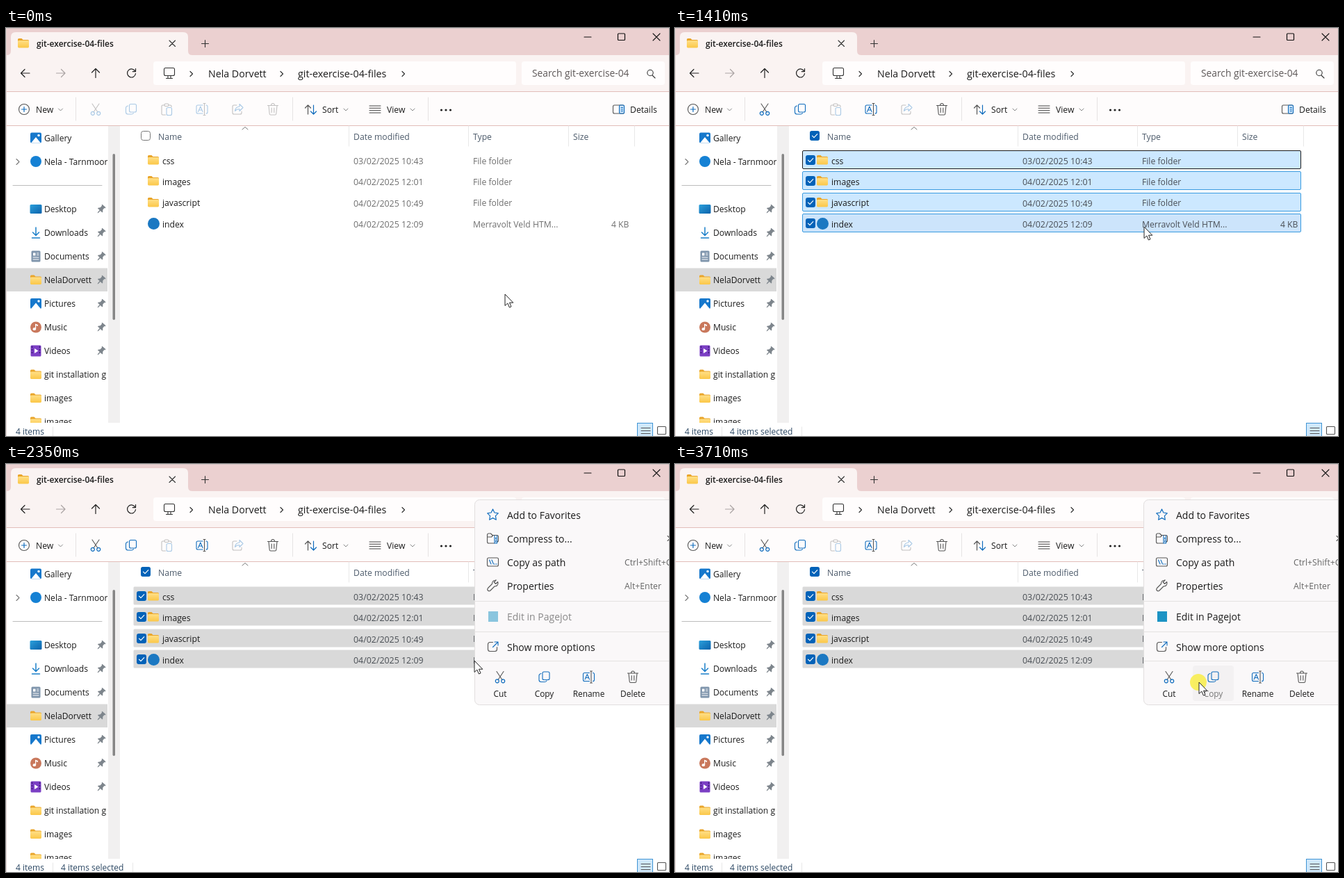
Write an HTML page that moves like this. It is 954 px wide and 587 px high and loops after 3840 ms.

```html
<!DOCTYPE html>
<html lang="en">
<head>
<meta charset="utf-8">
<title>File explorer</title>
<style>
html, body { margin: 0; width: 100%; height: 100%; overflow: hidden; background: #fff; }
svg { display: block; width: 954px; height: 587px; }
text { font-family: "Open Sans", "Noto Sans", sans-serif; white-space: pre; }
</style>
</head>
<body>
<svg id="stage" viewBox="0 0 954 587" xmlns="http://www.w3.org/2000/svg"></svg>
<script>
const LOOP = 3840;
const INK = '#1b1b1b', BLUE = '#0f6cbd', GREY = '#555';

// Drawing helpers
const text = (x, cy, s, size = 12.2, fill = INK, more = '') =>
  `<text x="${x}" y="${cy + size * 0.36}" font-size="${size}" fill="${fill}" ${more}>${s}</text>`;
const rect = (x, y, w, h, fill, more = '') =>
  `<rect x="${x}" y="${y}" width="${w}" height="${h}" fill="${fill}" ${more}/>`;
const line = (d, color = GREY, w = 1.1, more = '') =>
  `<path d="${d}" fill="none" stroke="${color}" stroke-width="${w}" stroke-linecap="round" stroke-linejoin="round" ${more}/>`;
const shape = (d, fill, more = '') => `<path d="${d}" fill="${fill}" ${more}/>`;
const dot = (x, y, r, fill, more = '') => `<circle cx="${x}" cy="${y}" r="${r}" fill="${fill}" ${more}/>`;
const group = (id, body, more = '') => `<g id="${id}" ${more}>${body}</g>`;
const at = (x, y, body, more = '') => `<g transform="translate(${x} ${y})" ${more}>${body}</g>`;
const box = (x, y, w, h, color, r = 2) => rect(x, y, w, h, 'none', `rx="${r}" stroke="${color}" stroke-width="1.1"`);
const chevron = (x, y) => line(`M${x - 2} ${y - 3.5}l3.5 3.5l-3.5 3.5`, '#333', 1.2);
const drop = (x, y) => line(`M${x - 3} ${y - 1.5}l3 3l3 -3`, '#888', 1);

// Icons, each centred on 0,0
const icon = {
  cut: line('M-5 -8L3 4M5 -8L-3 4') + dot(-4.2, 5.8, 2.5, 'none', `stroke="${BLUE}" stroke-width="1.2"`) +
    dot(4.2, 5.8, 2.5, 'none', `stroke="${BLUE}" stroke-width="1.2"`),
  copy: box(-2.5, -7.5, 10, 11.5, BLUE) + line('M-4.5 -5q-3 .5-3 3v6q0 3 3 3h5q2 0 3-1.5', BLUE),
  paste: line('M-3 -6h-2.5q-1.5 0-1.5 1.5v11q0 1.5 1.5 1.5h4M3 -6h2.5q1.5 0 1.5 1.5v1') +
    box(-3, -8, 6, 3.5, GREY, 1.5) + box(0, -2.5, 7.5, 11, BLUE),
  rename: line('M1 -6h-7q-2 0-2 2v8q0 2 2 2h7M6 -6q2 0 2 2v8q0 2-2 2', BLUE) +
    line('M3.5 -8.5v17M2 -8.5h3M2 8.5h3', GREY) + line('M-5.5 3.5L-2.2 -4L1 3.5M-4.4 1h4.4', BLUE),
  share: line('M-1 -6h-4q-2 0-2 2v9q0 2 2 2h9q2 0 2-2v-2') +
    line('M-3.5 2.5q.5-6 6.5-6.5v-3.5l5 5l-5 5v-3q-4 0-6.5 3z', BLUE),
  trash: line('M-7.5 -5.5h15M-2.5 -5.5q0-3 2.5-3t2.5 3M-6 -5.5l1.2 12q.2 1.5 1.6 1.5h6.4q1.4 0 1.6-1.5l1.2-12M-1.8 -2v6.5M1.8 -2v6.5'),
  folder: shape('M-8 -5.5q0-1.5 1.5-1.5h4l2 2h7q1.5 0 1.5 1.5v4h-16z', '#e9a52b') +
    rect(-8, -4, 16, 10.5, 'url(#gold)', 'rx="1.4"'),
  pin: shape('M-3.4 -6h6.8v1.6h-1v3.6l2 2.4v1h-3.7v4l-.7 1.4l-.7-1.4v-4h-3.7v-1l2-2.4v-3.6h-1z', '#7d858c', 'transform="rotate(42)"'),
  photo: rect(-8, -7.5, 16, 15, '#1678cc', 'rx="2"') + shape('M-7 7.5L0 -1l7 8.5z', '#fff') + dot(4, -3.5, 1.7, '#fff'),
  desktop: rect(-8.5, -6.5, 17, 13, 'url(#desk)', 'rx="1.5"'),
  download: line('M0 -7.5v11M-4.5 -.5L0 4l4.5 -4.5M-5.5 7.5h11', '#1a7fc9', 1.5),
  doc: rect(-6.5, -8, 13, 16, '#7f95ac', 'rx="1.5"') + rect(-4, -5, 3.5, 4, '#fff') +
    line('M1.5 -4.5h2.5M1.5 -2h2.5M-4 1.5h8M-4 4.5h8', '#fff', 1),
  music: dot(0, 0, 8, '#c9785c') + shape('M-1 -5l4 1.5v2l-2.8-1v5a2.3 2 0 1 1-1.2-1.7z', '#fff'),
  video: rect(-7.5, -8, 15, 16, '#7b3fc4', 'rx="1.5"') + shape('M-2 -3.5l5.5 3.5l-5.5 3.5z', '#fff') +
    line('M-5.5 -6v12M5.5 -6v12', '#3e1a78', 1.6, 'stroke-dasharray="1 3"'),
  star: line('M0 -8l2.4 5l5.4 .8l-3.9 3.9l.9 5.5l-4.8-2.6l-4.8 2.6l.9-5.5l-3.9-3.9l5.4-.8z', BLUE, 1.2),
  zip: line('M2 7h-8q-2 0-2-2v-10q0-2 2-2h3l2.5 2.5h6.500q2 0 2 2v5.500q0 2-2 2') + line('M-8 -2h6l2-2') +
    line('M2.500 -4v11h3.500v-11M4.200 -1v2M4.200 3v2', BLUE),
  path: box(-8, -6, 16, 12, GREY) + line('M-5 -3l2.500 6M-1.500 -3l2.500 6', BLUE) + dot(3, 3, .8, BLUE) + dot(5.500, 3, .8, BLUE),
  wrench: line('M3.500 -7.500q-4.500 0-4.500 5l-6 6q-1.500 2 0 3.500t3.500 0l6-6q5 0 5-5l-.300-1.500l-3 3l-2.500-2.500l3-3z'),
  more: line('M0 -6.500h-4q-3 0-3 3v7q0 3 3 3h7q3 0 3-3v-3') + line('M2.500 -7h5v5M7 -6.500L0 .500', BLUE)
};
icon.tick = box => rect(box[0], box[1], 14, 14, '#0062b8', 'rx="3"') +
  line(`M${box[0] + 3.5} ${box[1] + 7.2}l2.500 2.500l4.700 -5`, '#fff', 1.2);

function titleBar() {
  return rect(0, 0, 954, 92, '#faf3f2') + rect(0, 0, 954, 39, '#ebd0d0') +
    shape('M1 39q6 0 6-6v-20q0-7 7-7h241q7 0 7 7v20q0 6 6 6z', '#faf3f2') +
    line('M0 .5h954', '#d6c6c6', 1) +
    at(25, 22, icon.folder) + text(44, 22.5, 'git-exercise-04-files', 12, INK, 'font-weight="600"') +
    line('M235 18l8.5 8.5M243.500 18l-8.500 8.500M281.500 22.500h10M286.500 17.500v10', '#333') +
    line('M832 13h10M931 8l10 10M941 8l-10 10', '#111', 1.1) + rect(880.5, 8, 10, 9.5, 'none', 'rx="1" stroke="#111" stroke-width="1.2"');
}

function navBar() {
  return rect(212, 48, 522, 34, '#fffdfd', 'rx="4"') + rect(742, 48, 206, 34, '#fffdfd', 'rx="4"') +
    line('M21.5 65h12.500M27 59.500l-5.500 5.500l5.500 5.500', '#222', 1.2) +
    line('M72.500 65h12.500M79.500 59.500l5.500 5.500l-5.500 5.500', '#a9a3a3', 1.2) +
    line('M129 71.500v-13M123.500 64l5.500 -5.500l5.500 5.500', '#222', 1.2) +
    line('M186 62.500a6 6 0 1 0 .500 3M186.500 58.500v4.200h-4.200', '#222', 1.2) +
    box(227.5, 57.5, 15, 11, '#333') + line('M233 69v3M237 69v3M230.500 72.500h9', '#333') +
    chevron(267, 66) + text(291, 65.500, 'Nela Dorvett', 14.2) +
    chevron(397, 66) + text(420, 65.500, 'git-exercise-04-files', 14.3) + chevron(572, 66) +
    text(757, 65.500, 'Search git-exercise-04', 13.8, '#5c5757') +
    dot(927, 64.500, 4.2, 'none', 'stroke="#333" stroke-width="1.1"') + line('M930 68l4 4', '#333');
}

function toolBar() {
  const tools = [['cut', 129], ['copy', 180], ['paste', 231], ['rename', 282], ['share', 333], ['trash', 384]];
  return rect(0, 92, 954, 49, '#fefcfc') + line('M0 91.500h954M0 140.500h954', '#e2bdb9', 1) +
    dot(26, 117, 7.5, 'none', 'stroke="#555" stroke-width="1.1"') + line('M22.500 117h7M26 113.500v7', BLUE, 1.2) +
    text(43, 117.500, 'New') + drop(78.500, 117.500) +
    line('M100.500 100v33M412.500 100v33M607.500 100v33', '#e6e3e3', 1) +
    tools.map(([n, x]) => at(x, 117, icon[n], `id="tool-${n}" opacity=".35"`)).join('') +
    line('M434.500 124v-13M430.500 115l4 -4l4 4', GREY, 1.2) + line('M442.500 111v13M438.500 120l4 4l4 -4', BLUE, 1.2) +
    text(455, 117.500, 'Sort') + drop(489, 117.500) +
    line('M523 112h16M523 115.300h16M523 118.600h16M523 122h16', '#444', 1) +
    text(548, 117.500, 'View') + drop(585, 117.500) +
    [626.5, 633, 639.5].map(x => dot(x, 118, 1.6, '#222')).join('') +
    box(873.5, 111, 16, 12, GREY) + rect(882.5, 111.5, 6.5, 11, '#cfe6fa') + box(882.5, 111, 7, 12, BLUE, 1.5) +
    line('M885 114.500h2.500M885 117h2.500M885 119.500h2.500', BLUE, 1) + text(898, 117.500, 'Details');
}

function sideBar() {
  const items = [['desktop', 'Desktop'], ['download', 'Downloads'], ['doc', 'Documents'], ['folder', 'NelaDorvett'],
    ['photo', 'Pictures'], ['music', 'Music'], ['video', 'Videos'], ['folder', 'git installation g'],
    ['folder', 'images'], ['folder', 'images']];
  const list = items.map(([n, s], i) => {
    const y = 260.5 + 34 * i;
    return at(43, y, icon[n]) + text(55, y + .5, s, 12.1) + (i < 7 ? at(137, y, icon.pin) : '');
  }).join('');
  return `<g clip-path="url(#side)">` + rect(0, 345.5, 146, 33.500, '#d9d9d9') + at(43, 158, icon.photo) +
    text(55, 158.500, 'Gallery', 12.1) + line('M15 188.500l4 4l-4 4', '#777') + dot(43, 192, 8, '#1581d4') +
    text(55, 192.500, 'Nela - Tarnmoor', 12.1) + line('M10 226.500h128', '#bdbdbd', 1) + list + '</g>' +
    rect(147, 141, 17, 427, '#f1f0f0') + rect(153.5, 181, 3.5, 239, '#868686', 'rx="1.75"');
}

const rows = [['css', '03/02/2025 10:43', 'File folder'], ['images', '04/02/2025 12:01', 'File folder'],
  ['javascript', '04/02/2025 10:49', 'File folder'], ['index', '04/02/2025 12:09', 'Merravolt Veld HTM...', '4 KB']];

function fileList() {
  const head = '#4d5b6b';
  return line('M493.500 141v29M665.500 141v29M809.500 141v29M904.500 141v29', '#e8e8e8', 1) +
    line('M340 146l4 -3.500l4 3.500', '#777', 1) +
    rect(194.5, 148.5, 13, 13, '#fff', 'rx="3" stroke="#777" stroke-width="1"') + group('tick-all', icon.tick([194, 148])) +
    text(219, 156.500, 'Name', 12.2, head) + text(500, 156.500, 'Date modified', 12.2, head) +
    text(672, 156.500, 'Type', 12.2, head) + text(816, 156.500, 'Size', 12.2, head) +
    rows.map(([name, date, type, size], i) => {
      const y = Math.round(30.4 * i), c = 191 + 30.4 * i;
      return rect(183.5, 176.5 + y, 717, 26, '#cce8ff', `id="row${i}" rx="1.5"`) +
        group('tick' + i, icon.tick([188, 183 + y])) +
        (i < 3 ? at(212, 190 + y, icon.folder) : dot(212.5, 281.500, 8.5, '#1b78c2')) +
        text(225, c + .3, name) +
        group('meta' + i, text(500, c + .3, date, 12.4, '') + text(672, c + .3, type, 12.2, '') +
          (size ? text(896.5, c + .3, size, 12.2, '', 'text-anchor="end"') : ''));
    }).join('');
}

function statusBar() {
  const c = '#2b4763';
  return rect(0, 568, 954, 19, '#fff') + text(14, 581, '4 items', 12, c) + line('M67.500 574v13', '#e8e8e8', 1) +
    group('picked', text(79, 581, '4 items selected', 12, c) + line('M182.500 574v13', '#e8e8e8', 1)) +
    rect(908.5, 568.5, 22, 22, '#cfe8fb', 'stroke="#3f94d4"') +
    line('M914 575.500h13M914 579.500h13M914 583.500h13', '#555', 1) + box(937.5, 573.5, 12, 11, '#555', 1);
}

function menu() {
  const top = [['star', 'Add to Favorites'], ['zip', 'Compress to...'], ['path', 'Copy as path'], ['wrench', 'Properties']];
  const acts = [['cut', 'Cut', 711], ['copy', 'Copy', 774.5], ['rename', 'Rename', 838.5], ['trash', 'Delete', 902]];
  const rule = y => line(`M675 ${y}h280`, '#e4e2e2', 1);
  return rect(674.5, 51.5, 300, 295, '#faf8f9', 'id="panel" rx="7" stroke="#e1dede"') +
    rect(681, 290, 60, 51, '#f3f1f2', 'id="hot-Cut" rx="4"') + rect(745, 290, 59, 51, '#f3f1f2', 'id="hot-Copy" rx="4"') +
    group('head', top.map(([n, s], i) => at(700.5, 73 + 34 * i, icon[n], 'class="lead"') + text(721, 73.500 + 34 * i, s, 14)).join('') +
      line('M952 103.500l3.500 3.500l-3.500 3.500', GREY) +
      text(890, 141.500, 'Ctrl+Shift+C', 12.2, '#666') + text(890, 175.500, 'Alt+Enter', 12.3, '#666') + rule(197.5)) +
    group('wait', [185.5, 219.5].map(y => text(721, y, 'Loading...', 14, '#8c8c8c')).join('')) +
    group('edit', rect(694, 212, 14, 15, '#1c93c4') + text(721, 219.500, 'Edit in Pagejot', 14)) +
    rule(241.5) + at(700.5, 263, icon.more, 'class="lead"') + text(721, 263.500, 'Show more options', 14) + rule(283.5) +
    acts.map(([n, s, x]) => at(x, 306.500, icon[n]) + text(x, 330.500, s, 11.9, INK, `id="act-${s}" text-anchor="middle"`)).join('');
}

const stage = document.getElementById('stage');
stage.innerHTML = `<defs>
  <linearGradient id="gold" x2="0" y2="1"><stop stop-color="#ffdf86"/><stop offset="1" stop-color="#fbc748"/></linearGradient>
  <linearGradient id="desk" x2="1" y2="1"><stop stop-color="#2ba0dc"/><stop offset="1" stop-color="#0c62ab"/></linearGradient>
  <clipPath id="side"><rect y="141" width="146" height="427"/></clipPath></defs>` +
  rect(0, 0, 954, 587, '#fff') + titleBar() + navBar() + toolBar() + fileList() + sideBar() + statusBar() +
  line('M.5 0v587', '#e6d6d5', 1) + group('menu', menu()) + dot(753, 314, 12, '#f9ee3c', 'id="click"') +
  group('cursor', shape('M0 0V16.500L3.800 13L6.400 19L9 17.900L6.500 12.200H11.800Z', '#fff', 'stroke="#222" stroke-width="1" stroke-linejoin="round"'));

const el = id => document.getElementById(id);
const set = (id, name, value) => el(id).setAttribute(name, value);
const show = (id, on) => set(id, 'visibility', on ? 'visible' : 'hidden');

// Pointer moves are sampled in eight steps
const glide = (t, t0, a, b, ease) => {
  const u = ease(Math.min(Math.floor((t - t0) / 69) / 7, 1));
  return a.map((v, i) => Math.round(v + (b[i] - v) * u));
};
const easeOut = u => 1 - (1 - u) ** 2;
const easeBoth = u => u * u * (3 - 2 * u);

function pointer(t) {
  if (t < 1010) return [718, 383];
  if (t < 2820) return glide(t, 1010, [689, 323], [674, 283], easeOut);
  return glide(t, 2820, [680, 290], [754, 314], easeBoth);
}

function draw(t) {
  const picked = t >= 400, enabled = t >= 470, opened = t >= 2090, loaded = t >= 2350;
  const [x, y] = pointer(t);
  set('cursor', 'transform', `translate(${x} ${y})`);

  for (const n of ['cut', 'copy', 'rename', 'trash']) set('tool-' + n, 'opacity', enabled ? 1 : .35);
  show('tick-all', picked);
  show('picked', picked);
  const focus = t < 1820 ? 0 : t < 1880 ? -1 : 3;
  rows.forEach((_, i) => {
    const hover = i === 3 && y < 295;
    show('row' + i, picked);
    show('tick' + i, picked);
    set('row' + i, 'fill', opened ? '#d9d9d9' : hover ? '#cce4fb' : '#cce8ff');
    set('row' + i, 'stroke', opened ? 'none' : i === focus ? '#1b1b1b' : '#3a9be0');
    set('meta' + i, 'fill', picked ? '#4a4f55' : '#6f6f6f');
    for (const s of el('meta' + i).children) s.removeAttribute('fill');
  });

  show('menu', opened);
  set('menu', 'opacity', t < 2160 ? .5 : 1);
  set('panel', 'y', loaded ? 51.5 : 17.5);
  set('panel', 'height', loaded ? 295 : 329);
  set('head', 'transform', `translate(0 ${loaded ? 0 : -34})`);
  set('wait', 'opacity', loaded ? 0 : 1);
  set('edit', 'opacity', loaded ? (t < 2430 ? .5 : 1) : 0);
  for (const i of document.querySelectorAll('.lead')) i.setAttribute('opacity', t < 2160 ? 0 : 1);

  const inside = opened && t >= 2890;
  set('hot-Cut', 'opacity', inside && x > 681 && x < 743 ? 1 : 0);
  set('hot-Copy', 'opacity', inside && x >= 745 ? 1 : 0);
  set('act-Copy', 'fill', t >= 3710 ? '#777' : INK);
  set('click', 'opacity', t < 3640 ? 0 : t < 3710 ? .5 : .8);
}

let start = null;
function tick(now) {
  if (start === null) start = now;
  draw((now - start) % LOOP);
  requestAnimationFrame(tick);
}
draw(0);
requestAnimationFrame(tick);
</script>
</body>
</html>
```
